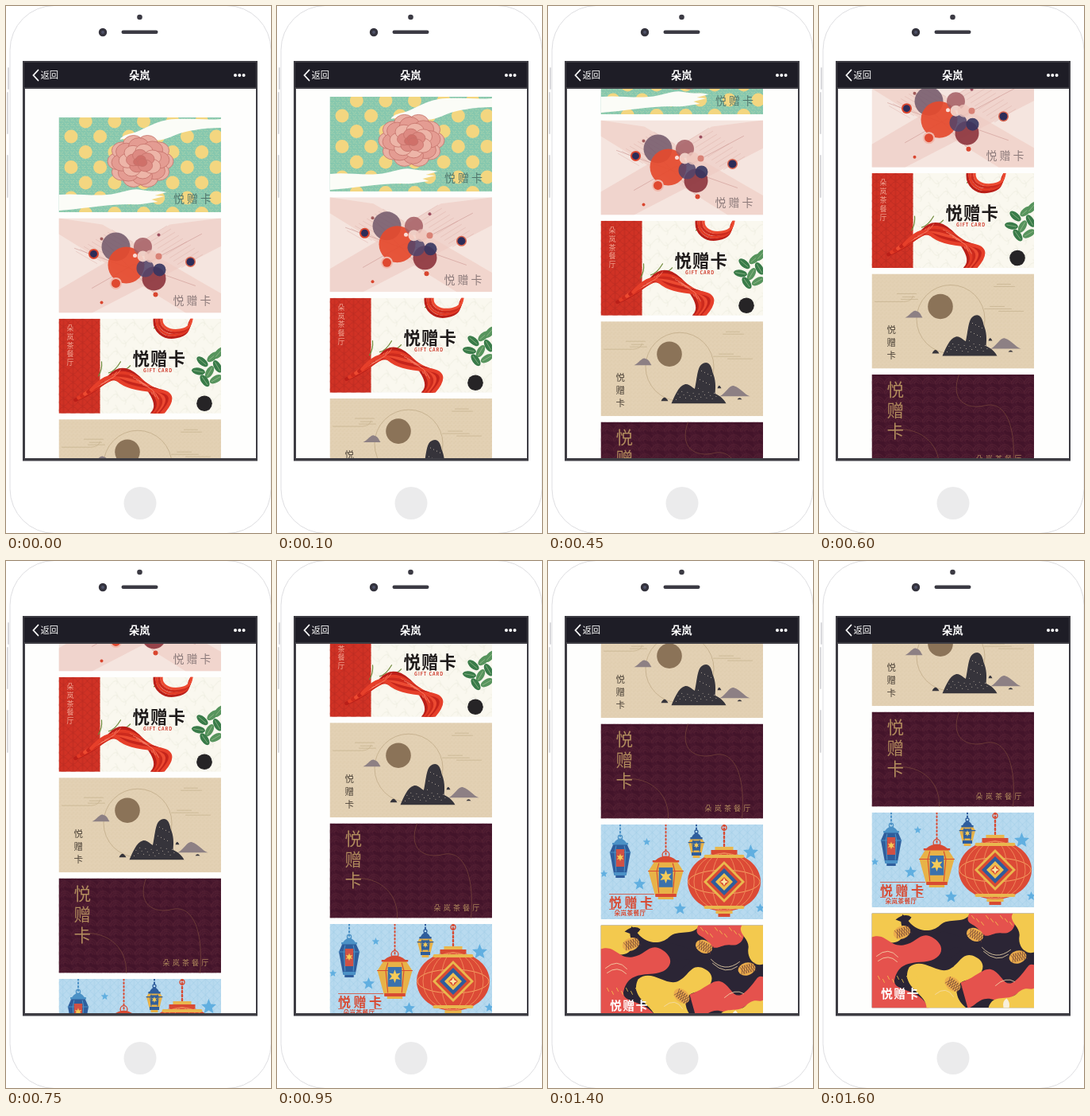
An HTML page for the animation above (1650 ms loop, 334x662 px).

```html
<!DOCTYPE html>
<html lang="zh">
<head>
<meta charset="utf-8">
<style>
  html, body { margin: 0; width: 100%; height: 100%; overflow: hidden; background: #fff; }
  svg { display: block; }
  text { font-family: "Noto Sans CJK SC", "Noto Sans CJK", sans-serif; white-space: pre; }
</style>
</head>
<body>
<svg id="stage" width="334" height="662" viewBox="0 0 334 662"></svg>
<script>
const BRAND = "朵岚", SHOP = BRAND + "茶餐厅", CARD = "悦赠卡";
const LOOP = 1650, STEP = 50, PITCH = 126.4;

// drawing helpers, each returns SVG markup
const range = n => [...Array(n).keys()];
const each = (list, fn) => list.map(fn).join("");
const dot = (x, y, r, fill, extra = "") => `<circle cx="${x}" cy="${y}" r="${r}" fill="${fill}" ${extra}/>`;
const oval = (x, y, rx, ry, fill, extra = "") => `<ellipse cx="${x}" cy="${y}" rx="${rx}" ry="${ry}" fill="${fill}" ${extra}/>`;
const box = (x, y, w, h, fill, extra = "") => `<rect x="${x}" y="${y}" width="${w}" height="${h}" fill="${fill}" ${extra}/>`;
const shape = (d, fill, extra = "") => `<path d="${d}" fill="${fill}" ${extra}/>`;
const line = (d, color, w = 1, extra = "") =>
  `<path d="${d}" fill="none" stroke="${color}" stroke-width="${w}" stroke-linecap="round" ${extra}/>`;
const label = (s, x, y, size, fill, weight = 400, gap = 0) =>
  `<text x="${x}" y="${y}" font-size="${size}" fill="${fill}" font-weight="${weight}" letter-spacing="${gap}">${s}</text>`;
const column = (s, x, y, size, pitch, fill, weight) =>
  each([...s], (ch, i) => label(ch, x, y + i * pitch, size, fill, weight));
const tile = (id, w, h, content) =>
  `<pattern id="${id}" width="${w}" height="${h}" patternUnits="userSpaceOnUse">${content}</pattern>`;
const full = fill => box(0, 0, 204.5, 119, fill);

function star(x, y, r, fill, points = 5, inner = 0.45) {
  const d = range(points * 2).map(i => {
    const a = i * Math.PI / points - Math.PI / 2, q = i % 2 ? r * inner : r;
    return (x + q * Math.cos(a)).toFixed(1) + " " + (y + q * Math.sin(a)).toFixed(1);
  });
  return shape("M" + d.join("L") + "Z", fill);
}

function rose(x, y) {
  const rings = [[28, 10, 13, "#eab0a4"], [23, 8, 13, "#e49c92"], [16, 7, 11, "#edb5a8"], [9, 5, 9, "#dd8a82"], [3, 3, 6, "#cf7069"]];
  return each(rings, ([r, n, size, fill], k) => each(range(n), i => {
    const a = i / n * 2 * Math.PI + k * 0.7;
    return oval(x + 1.02 * r * Math.cos(a), y + 0.82 * r * Math.sin(a), size, size * 0.82, fill,
      'stroke="#c4716a" stroke-width=".8"');
  }));
}

function roseCard() {
  const spots = each(range(11), i => each(range(4), j => dot(15.5 + 18.3 * i, (i % 2 ? 5 : 24) + 38.5 * j, 8.5, "#f3d680")));
  return full("#85c7ae") + full("url(#speckle)") + spots +
    shape("M205 2C185 4 160 0 137 3C118 6 105 17 92 20C82 22 78 25 77 28C87 26 94 24 99 25L84 35C96 33 106 27 115 28C133 32 144 21 160 18C180 14 192 13 205 13Z", "#fbfcf7") +
    rose(103, 55) +
    shape("M0 97C23 95 40 99 61 97C78 96 91 88 104 91C117 94 127 91 136 94L121 98L133 99L117 103L125 106C109 108 102 110 90 109C60 109 30 115 0 117Z", "#fbfcf7") +
    label(CARD, 144.5, 107, 14, "#52776d", 300, 3);
}

function circlesCard() {
  const circles = [
    [72, 36, 18, "#71576a", .85], [85, 59, 23, "#e54a2e", .92], [106, 36, 11.5, "#a55f64", .85], [120, 76, 15, "#8c343c", .9],
    [109, 63, 11, "#51456b", .85], [127, 65, 8, "#363661", .9], [44, 45, 6.5, "#d9462f", 1], [44, 45, 4.5, "#2c2c58", 1],
    [166, 55, 6.5, "#d9654f", 1], [166, 55, 5, "#2c2c58", 1], [106, 48, 7, "#f6d9cf", .9], [116, 48, 8, "#efc7bd", .8],
    [126, 48, 4, "#d98276", 1], [72, 82, 7.5, "#f0b8ab", 1], [72, 82, 5.5, "#df4930", 1], [54, 106, 2, "#d9462f", 1],
    [122, 96, 3, "#d9462f", 1], [54, 26, 2, "#a35c5c", 1], [126, 21, 2, "#9d5060", 1], [96, 47, 2.5, "#fff", .8]];
  return full("#f5e5df") +
    shape("M0 0L55 8L205 95V119H160L0 20Z", "#f0d0c7", 'opacity=".75"') +
    shape("M205 0L140 8L0 90V119H42L205 35Z", "#eecbc3", 'opacity=".65"') +
    each(range(10), i => line(`M${22 + i * 5} ${42 - i * 3}l26 15M${136 + i * 5} ${10 + i * 4}l-26 16`, "#d8a9a2", .4)) +
    line("M20 38L95 65L180 20M42 88L95 58L172 85M54 26L122 96", "#c48b86", .5) +
    each(circles, ([x, y, r, fill, o]) => dot(x, y, r, fill, `opacity="${o}"`)) +
    label(CARD, 144, 109, 14, "#8d7b7b", 300, 3);
}

function chilliCard() {
  const reds = ["#b91f19", "#e23a25", "#cc2a1d", "#ec4a31", "#c4241b", "#e63f2a"];
  const pods = each(reds, (c, i) => line(
    `M${21 + i * 4} ${102 - i * 2.5}Q${48 + i * 3} ${91 - i * 5} ${65 + i * 2} ${72 + i}T${106 + i * 3} ${80 + i * 2}T${118 + i * 2.4} 119`, c, 4.6) +
    line(`M${33 + i * 5} ${94 - i * 3}q14 -5 20 -15M${86 + i * 4} ${68 + i * 3}q14 4 20 18`, "#ff927a", .7));
  const wreath = each(range(4), i => line(
    `M${121 + i * 3} -2C${118 + i * 3} ${16 - i * 2} ${133 + i * 2} ${26 - i * 3} ${148 + i * 2} ${23 - i * 3}S${163 + i} ${14 - i * 4} ${165 + i} ${5 - i * 2}`,
    reds[i], 3.2));
  const leaves = [[181, 54, 40], [194, 48, -40], [176, 66, 10], [190, 67, -60], [200, 60, 60], [184, 78, 55], [198, 76, -30], [202, 43, -50]];
  return full("#faf8ef") + full("url(#veins)") + box(0, 0, 52, 119, "#d03225") + box(0, 0, 52, 119, "url(#scales)") +
    line("M50 72q5 -8 4 -18M63 68q8 -2 15 -14M76 66q9 -1 14 -7M120 12l7 -5M144 17l8 -2", "#6f8a3c", 1.2) + pods + wreath +
    each(leaves, ([x, y, a]) => oval(x, y, 8.5, 4.4, a > 0 ? "#397b49" : "#57945d", `transform="rotate(${a} ${x} ${y})"`) +
      line(`M${x - 6} ${y}h12`, "#a5c596", .6, `transform="rotate(${a} ${x} ${y})"`)) +
    column(SHOP, 10, 15, 9, 10.9, "#f2a795", 400) +
    label(CARD, 93, 58, 21.5, "#1f1b1b", 900, 1) +
    `<text x="106.5" y="67" font-size="5.6" font-weight="700" letter-spacing=".9" fill="#cf3a2b">GIFT CARD</text>` +
    dot(183.5, 106.5, 9.8, "#262426");
}

function inkCard() {
  const dark = "#36343b", haze = "#8d8084";
  const flecks = each(range(22), i => dot(95 + i * 2.4, 98 - (i * 7 % 11), .55, "#bbb0a2") + (i < 9 ? dot(123 + i * 2, 84 - (i * 11 % 24), .55, "#bbb0a2") : ""));
  return full("#e3d1b4") + full("url(#grain)") + dot(99.5, 57, 43, "none", 'stroke="#bca783" stroke-width=".7"') +
    dot(86.5, 41, 15.8, "#8b7358") +
    line("M32 25h24M39 29h15M4 35h36q10 0 12 -7M37 32h21M158 13h17M154 16h26M142 44h34M149 41h18M160 47h31", "#c5b08d", .7) +
    shape("M42 55C50 51 52 44 57 47C61 48 62 52 64 55Z", haze) +
    shape("M150 94C159 89 162 79 168 81C177 84 180 91 188 94Z", haze) +
    shape("M117 91C121 78 121 58 127 54C134 49 139 53 141 64C145 73 145 82 144 91Z", dark) +
    shape("M89 103C93 94 98 81 106 79C113 78 117 87 127 88C142 87 153 94 158 103Z", dark) + flecks +
    shape("M76 100q4 -9 9 0ZM145 100q4 -10 10 0ZM147 84q2 -7 5 0ZM172 98q3 -4 6 0Z", dark) +
    column(CARD, 19, 75, 11.5, 16, "#4a4036", 400);
}

function wineCard() {
  return full("#43142a") + full("url(#waves)") +
    line("M110 0C98 32 119 45 143 39S183 62 178 119M26 70C55 64 87 83 85 119", "#79483c", .7) +
    column(CARD, 19, 27, 21.5, 26, "#b18b5d", 300) +
    label(SHOP, 131, 109, 9, "#b18b5d", 400, 3.2);
}

function lantern(x, y, w, h, body, trim, pane) {
  const l = x - w / 2, b = y + h, k = w * .2;
  return line(`M${x} 0V${y - 7}`, trim, 2, 'stroke-dasharray="1.5 3"') +
    dot(x, y - 7, w * .1, "none", `stroke="${trim}" stroke-width="1.3"`) +
    shape(`M${l + k} ${y}Q${x} ${y - 11} ${l + w - k} ${y}Z`, trim) +
    shape(`M${l + k} ${y}H${l + w - k}L${l + w} ${y + h * .3}L${l + w - k} ${b}H${l + k}L${l} ${y + h * .3}Z`, body) +
    box(l + k * .6, y, w - k * 1.2, 2.5, trim) + box(l + k, b - 3, w - 2 * k, 4, trim) + box(l + k * 1.4, b + 1, w - k * 2.8, 3, body) +
    line(`M${l} ${y + h * .3}H${l + w}M${x - k} ${y + 4}L${x - k * 1.3} ${y + h * .3}L${x - k} ${b - 4}M${x + k} ${y + 4}L${x + k * 1.3} ${y + h * .3}L${x + k} ${b - 4}`, trim, 1.1) +
    box(x - k, y + h * .2, 2 * k, h * .55, pane) + star(x, y + h * .46, k * .95, "#f5cb58", 6);
}

function lanternCard() {
  const red = "#d84a32", stars = [[49, 75, 8], [133, 65, 6], [189, 35, 10], [58, 22, 5], [100, 106, 8], [4, 62, 5], [201, 105, 6]];
  const big = dot(155.5, 4, 3, "none", `stroke="${red}" stroke-width="1.3"`) + line("M155.5 0V30", red, 2.4, 'stroke-dasharray="2 3"') +
    box(144, 28, 23, 5, "#e9b74e") + box(139, 32, 33, 5, red) + box(145, 107, 21, 5, "#e9b74e") + box(148, 112, 15, 4, red) +
    oval(155.5, 72, 46, 37, "#dc4a36") + oval(155.5, 72, 45, 15, "none", 'stroke="#f3a060" stroke-width="1"') +
    each([15, 28, 38], r => oval(155.5, 72, r, 36, "none", 'stroke="#ee8657" stroke-width="1"')) +
    box(130, 38, 51, 4, "#e9b74e", 'rx="2"') + box(130, 102, 51, 4, "#e9b74e", 'rx="2"') +
    each([[26, "#e9b74e"], [22, "#d84a32"], [17, "#2e5d9c"], [11, "#f0bf50"], [6, "#d84a32"]],
      ([r, fill]) => shape(`M${155.5 - r} 72L155.5 ${72 - r}L${155.5 + r} 72L155.5 ${72 + r}Z`, fill)) +
    star(155.5, 72, 5, "#fbe6a3", 4);
  return full("#b8daef") + full("url(#weave)") + each(stars, ([x, y, r]) => star(x, y, r, "#61afe0")) +
    lantern(24.5, 23, 26, 40, "#2e5d9c", "#4b91c6", "#cf5145") +
    lantern(82, 45, 44, 45, "#e8b247", red, "#3b71ac") +
    lantern(120.5, 16, 20, 22, "#e8b247", "#2e5d9c", "#315f9b") + big +
    line("M11 87.5H67M11 106.5H17M57 106.5H65", red, .8) +
    label(CARD, 10.5, 104, 16, red, 800, 3.5) + label(SHOP, 17, 114, 7.6, red, 700, .4);
}

function seed(x, y, a) {
  return `<g transform="translate(${x} ${y}) rotate(${a})">` + oval(0, 0, 11, 8, "#ecad4c") +
    each(range(6), i => line(`M${-8 + i * 3} -5l4 10M${-4 + i * 3} -5l-4 10`, "#6b3c36", .6)) + "</g>";
}

function wildCard() {
  const red = "#e5524d", gold = "#f3c94e", ink = "#2b2535";
  return full(ink) +
    shape("M0 0H40C30 14 48 25 35 34S12 28 0 38Z", gold) +
    shape("M0 30C18 24 22 43 40 40S62 20 79 32S86 60 66 61S34 64 29 82S58 91 72 119H0Z", red) +
    shape("M38 0H125C115 15 98 4 86 15S58 22 49 13Z", gold) +
    shape("M123 0H178C185 14 177 27 164 25S145 35 137 23S116 15 123 0Z", red) +
    shape("M178 0H205V49C193 53 184 41 186 29S171 10 178 0Z", gold) +
    shape("M47 68C63 54 81 76 96 71S113 46 131 55S137 83 121 84S101 105 119 119H69C70 101 35 93 47 68Z", gold) +
    shape("M112 87C132 81 142 65 154 72S168 97 183 83S196 62 205 65V98C184 91 174 116 155 109S130 119 121 119Z", red) +
    shape("M147 119C153 99 171 112 183 101S199 98 205 94V119Z", gold) +
    shape("M80 28C93 15 105 34 122 29S139 38 128 45S87 47 80 28Z", ink) +
    shape("M88 54q14 -15 25 -10q-8 15 -25 10ZM30 8q12 -9 20 -3q-5 10 -20 3Z", ink) +
    seed(38, 24, -20) + seed(130, 27, 25) + seed(184, 55, -15) + seed(102, 89, 40) +
    line("M6 54q15 -13 27 1M8 60q13 -10 24 1M139 43q17 18 36 3M141 48q16 15 31 4M80 102q14 -12 23 3M156 91q13 -12 24 -5", "#f4ddb0", .8) +
    each(range(9), i => line(`M${126 + i * 6} ${3 + i % 3 * 4}l3 4M${8 + i * 6} ${79 + i % 2 * 4}l2 4`, gold, .8)) +
    shape("M166 119q-2 -9 4 -12q5 5 3 12Z", "#f8efdb") +
    label(CARD, 11.5, 107, 15, "#fff", 800, 1.2);
}

const cards = [roseCard, circlesCard, chilliCard, inkCard, wineCard, lanternCard, wildCard];
const patterns =
  tile("speckle", 7, 6, line("M1 1l1 1M4 2l1 -1M2 4h1M6 5l-1 -1", "#c0dcae", .8)) +
  tile("veins", 22, 18, line("M0 9Q6 0 11 9T22 9M5 0q5 5 2 9M16 9q5 5 1 9", "#e8e8d8", .6)) +
  tile("scales", 12, 10, line("M0 5Q6 -4 12 5Q6 14 0 5M6 0V10", "#b5281f", .7)) +
  tile("grain", 5, 5, line("M1 1h1M3 4h1", "#d8c4a3", .7)) +
  tile("waves", 16, 12, each([3, 5.5, 8], r => dot(8, 12, r, "none", 'stroke="#5e2738" stroke-width=".7"') +
    dot(0, 6, r, "none", 'stroke="#562036" stroke-width=".6"'))) +
  tile("weave", 10, 10, line("M0 5L5 0L10 5L5 10ZM5 0V10", "#9fcbe6", .6));

stage.innerHTML = `<defs>${patterns}</defs>` +
  line("M3 78V104M2 109V160M2 188V240", "#dadadd", 2) +
  box(5, -.5, 329, 663, "#fff", 'rx="56" stroke="#dedee1"') +
  dot(168.5, 14, 3.3, "#3b3a43") + dot(122, 33, 5.2, "#34333d") + dot(122, 33, 2, "#4e5268") +
  box(145.5, 30.5, 46, 4.6, "#3b3a43", 'rx="2.3"') + dot(169, 624.5, 20.5, "#ebebec") +
  box(21, 69, 296, 502.5, "#3d3c43") + box(23, 71, 292, 31, "#1e1d26") +
  line("M40.5 80.5L34.5 87L40.5 93.5", "#fff", 1.8) + label("返回", 43.5, 91, 11.3, "#fff") +
  label(BRAND, 155, 91.5, 13.3, "#fff", 700) + each([289, 294.3, 299.6], x => dot(x, 87, 2, "#fff")) +
  `<svg x="24" y="104" width="291" height="464" viewBox="24 104 291 464">${box(24, 104, 291, 464, "#fefefd")}<g id="list">` +
  each(cards, (draw, i) => `<svg x="66.5" y="${140 + i * PITCH}" width="204.5" height="119">${draw()}</svg>`) + "</g></svg>";

// scroll keys: time, offset, speed
const keys = [[0, 0, .25], [250, 67, .27], [450, 123, .33], [750, 247, .39], [950, 316, .33], [1200, 396, .3], [1600, 456, 0]];

function scrollAt(t) {
  const i = Math.max(1, keys.findIndex(k => k[0] >= t));
  const [t0, y0, v0] = keys[i - 1], [t1, y1, v1] = keys[i];
  const d = t1 - t0, u = (t - t0) / d, w = 1 - u;
  return w * w * ((1 + 2 * u) * y0 + u * d * v0) + u * u * ((3 - 2 * u) * y1 - w * d * v1);
}

const list = document.getElementById("list"), start = performance.now();
function frame(now) {
  const t = Math.floor(Math.max(0, now - start) % LOOP / STEP) * STEP;
  list.setAttribute("transform", `translate(0 ${-scrollAt(t).toFixed(2)})`);
  requestAnimationFrame(frame);
}
frame(start);
</script>
</body>
</html>
```
